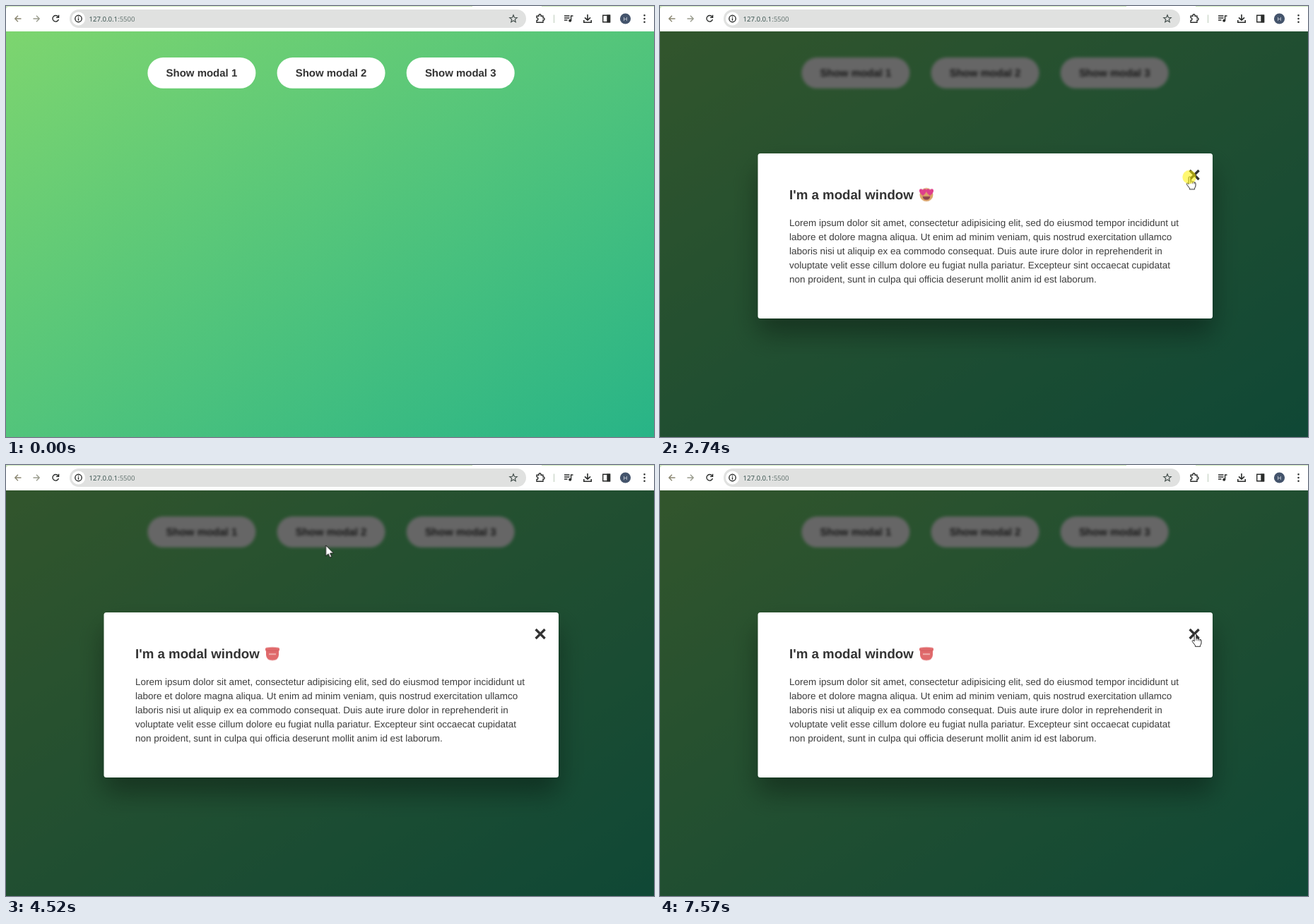
Recreate the animation shown at these times as an HTML page. Size 917 by 611 pixels, loop 8000 ms.

```html
<!DOCTYPE html>
<html lang="en">
<head>
<meta charset="utf-8">
<title>Modal windows</title>
<style>
  html, body { margin: 0; width: 100%; height: 100%; overflow: hidden; background: #fff; }
  .page { position: absolute; left: 0; top: 36px; width: 917px; height: 575px;
    background: linear-gradient(to top left, #28b487, #7dd56f); }
  svg { position: absolute; left: 0; top: 0; width: 917px; height: 611px; }
  text { font-family: "Liberation Sans", Arial, sans-serif; fill: #333; text-rendering: geometricPrecision; white-space: pre; }
  .btn text { font-size: 14.97px; font-weight: 700; }
  .title { font-size: 18.7px; font-weight: 700; }
  .copy text { font-size: 13.47px; fill: #3c3c3c; }
  .url { font: 9.6px "Open Sans", "Noto Sans", sans-serif; fill: #2f4a46; }
  .ico { fill: none; stroke: #2b2d2c; stroke-width: 1.4; }

  .btns, .overlay, .love, .hand, .arrow, .press, .cursor { animation: 8s step-end infinite; }
  .btns { animation-name: blur; }
  .overlay { animation-name: open; }
  .love { animation-name: love; }
  .angry { animation: love 8s step-end infinite reverse; }
  .hand { animation-name: hand; }
  .arrow { animation-name: arrow; }
  .press { animation-name: press; }
  .cursor { animation-name: move; animation-timing-function: linear; }

  @keyframes open {
    0%, 35.875%, 75.25% { opacity: 0; }
    17.875%, 53%, 86%, 100% { opacity: 1; }
  }
  @keyframes blur {
    0%, 35.875%, 75.25% { filter: none; }
    17.875%, 53%, 86%, 100% { filter: blur(2px); }
  }
  @keyframes love { 0% { opacity: 1; } 45%, 100% { opacity: 0; } }
  @keyframes hand {
    0%, 17.875%, 35.875%, 53%, 75.25%, 86% { opacity: 0; }
    12.625%, 30.875%, 46.5%, 63.625%, 80.625%, 93.125%, 100% { opacity: 1; }
  }
  @keyframes arrow {
    0%, 12.625%, 30.875%, 46.5%, 63.625%, 80.625%, 93.125%, 100% { opacity: 0; }
    3%, 17.875%, 35.875%, 53%, 75.25%, 86% { opacity: 1; }
  }
  @keyframes press {
    0%, 17.875%, 35.875%, 53%, 75.25%, 86%, 100% { opacity: 0; }
    17%, 34.25%, 51.375%, 74.375%, 84.375% { opacity: .56; }
  }
  @keyframes move {
    0%, 3% { transform: translate(880px, 600px); }
    6.5% { transform: translate(560px, 340px); }
    8.25% { transform: translate(287px, 116px); }
    9% { transform: translate(232px, 62px); }
    9.875% { transform: translate(210px, 35px); }
    10.875% { transform: translate(217px, 42px); }
    11.875% { transform: translate(239px, 73px); }
    12.625% { transform: translate(246px, 84px); }
    13.5%, 20.375% { transform: translate(247px, 82px); }
    22.125% { transform: translate(300px, 108px); }
    25% { transform: translate(540px, 215px); }
    27.5% { transform: translate(700px, 252px); }
    30% { transform: translate(743px, 250px); }
    30.875%, 35.875% { transform: translate(749px, 242.5px); }
    38.5% { transform: translate(728px, 240px); }
    40.25% { transform: translate(500px, 173px); }
    41.125% { transform: translate(478px, 169px); }
    42% { transform: translate(446px, 164px); }
    43.75%, 45% { transform: translate(405px, 132px); }
    48.125%, 55.625% { transform: translate(428px, 95px); }
    57.5% { transform: translate(480px, 135px); }
    60% { transform: translate(660px, 225px); }
    61.875% { transform: translate(735px, 255px); }
    64.375%, 75.25% { transform: translate(757px, 245px); }
    77.5% { transform: translate(700px, 190px); }
    79.375% { transform: translate(615px, 120px); }
    81.125%, 86.875% { transform: translate(597px, 106px); }
    89.375% { transform: translate(660px, 162px); }
    91.875% { transform: translate(740px, 232px); }
    93.75% { transform: translate(758px, 243px); }
    94.625%, 100% { transform: translate(757px, 240px); }
  }
</style>
</head>
<body>
<div class="page"></div>
<svg viewBox="0 0 917 611">
  <defs>
    <filter id="soft" x="-20%" y="-50%" width="140%" height="200%"><feGaussianBlur stdDeviation="18.5"/></filter>
    <clipPath id="view"><path d="M0 36H917V611H0Z"/></clipPath>
    <path id="heart" d="M0 4.6C-5.4 .8-5-3.4-2.4-3.6-1-3.6 0-2.4 0-1.6 0-2.4 1-3.6 2.4-3.6 5-3.4 5.4 .8 0 4.6Z"/>
  </defs>

  <!-- Browser bar -->
  <path d="M0 0H917V36H0Z" fill="#fff"/>
  <path d="M0 0H660V1H4Q1 1 0 4ZM758 0H917V1H758Z" fill="#cfe8bd"/>
  <rect x="90" y="5" width="646" height="26" rx="13" fill="#e0e1e0"/>
  <circle cx="102.5" cy="18" r="9.5" fill="#fff"/>
  <text class="url" x="117.5" y="21.6">127.0.0.1<tspan fill="#5f706c">:5500</tspan></text>
  <g class="ico">
    <path d="M21.5 18H13M17 13.8 12.8 18 17 22.2" stroke="#8b8772"/>
    <path d="M38.5 18H47M43 13.8 47.2 18 43 22.2" stroke="#9a9c8e"/>
    <path d="M74 15.6A4.3 4.3 0 1 0 74.4 19M74.6 12.8V16.4H71"/>
    <circle cx="102.5" cy="18" r="4.7"/>
    <path d="M102.5 17.2V20.8M102.5 15V16.3"/>
    <path d="M718 12.8 719.4 16.3 723.2 16.6 720.3 19 721.2 22.7 718 20.7 714.8 22.7 715.7 19 712.8 16.6 716.6 16.3Z" stroke="#47524f" stroke-width="1.2"/>
    <path d="M751 14.2H754V13.3A1.4 1.4 0 0 1 757 13.3V14.2H760V17H760.6A1.4 1.4 0 0 1 760.6 20H760V23.2H751V20.4A1.9 1.9 0 0 0 751 16.6Z"/>
    <path d="M775.5 12.5V24" stroke="#c9d5c8" stroke-width="1.3"/>
    <path d="M790 14H797.5M790 17H797.5M790 20H794.5M799.6 21V14H802.5"/>
    <circle cx="798.2" cy="20.8" r="1.3" fill="#2b2d2c"/>
    <path d="M823 12V20M819 16.4 823 20.2 827 16.4M817.8 20V23.3H828.2V20" stroke-width="1.6"/>
    <path d="M844.7 13.3H854.5V22.7H844.7Z"/>
    <path d="M851 13.3H854.5V22.7H851Z" fill="#2b2d2c"/>
  </g>
  <circle cx="876.5" cy="18" r="7.6" fill="#44546c"/>
  <text x="876.5" y="20.8" font-size="7.5" text-anchor="middle" style="fill:#e8ecf2">H</text>
  <path d="M903.5 13.2v.01M903.5 18v.01M903.5 22.8v.01" stroke="#2b2d2c" stroke-width="2.5" stroke-linecap="round"/>

  <g clip-path="url(#view)">
    <g class="btns" id="btns"></g>
    <g class="overlay">
      <path d="M0 36H917V611H0Z" opacity=".6"/>
      <rect x="138.5" y="231" width="643.5" height="234" rx="4" opacity=".34" filter="url(#soft)"/>
      <rect x="138.5" y="209" width="643.5" height="234" rx="3.5" fill="#fff"/>
      <path d="M749.6 233 762.6 246M762.6 233 749.6 246" stroke="#333" stroke-width="3.3"/>
      <text class="title" x="183" y="274">I'm a modal window</text>
      <g class="love" transform="translate(377 267.5)">
        <circle r="9.5" fill="#dca468"/>
        <path d="M-5.5 2.5H5.5Q4.6 7.3 0 7.3T-5.5 2.5Z" fill="#8c3f4e"/>
        <g fill="#df3f8c">
          <use href="#heart" transform="translate(-5 -4) scale(1.2)"/>
          <use href="#heart" transform="translate(5 -4) scale(1.2)"/>
        </g>
      </g>
      <g class="angry-face" id="angry" transform="translate(377 267.5)">
        <path d="M-8.5-8.5Q0-10 8.5-8.5L10-7.5V-5L9-3.5V2Q8.4 9.4 0 9.4T-9 2V-3.5L-10-5V-7.5Z" fill="#e06a6c"/>
        <path d="M-5 .6H5" stroke="#f6d2d0" stroke-width="1.3"/>
        <path d="M-8-4.5Q0-3.4 8-4.5" fill="none" stroke="#cf585c" stroke-width=".8"/>
      </g>
      <g class="copy" id="copy"></g>
    </g>
  </g>

  <g class="cursor">
    <path class="arrow" d="M0 0V15.2L3.5 12 5.8 17.3 8.2 16.2 6 11.1H10.8Z" fill="#fff" stroke="#111" stroke-width=".9"/>
    <g class="hand" stroke="#1a1a1a" stroke-width=".95" stroke-linejoin="round">
      <path fill="#fff" d="M-.9 10V1.2Q-.9-.5 .5-.5T1.9 1.2V6Q4.2 5 4.5 6.8 6.6 6 6.9 7.6 9 7.1 9 9V12Q9 14.2 7.6 15.6V17.3H.4V15.8L-3.5 10.6Q-4.3 9 -3.1 8.5 -2 8.2 -.9 10Z"/>
      <path fill="none" d="M1.9 6V9M4.5 6.8V9.4M6.9 7.6V9.8" stroke-width=".7"/>
    </g>
    <circle class="press" r="9.7" fill="#fff200"/>
  </g>
</svg>
<script>
  const svg = (parent, tag, attrs, text = '') => {
    const el = document.createElementNS('http://www.w3.org/2000/svg', tag);
    for (const key in attrs) el.setAttribute(key, attrs[key]);
    el.textContent = text;
    return parent.appendChild(el);
  };
  const byId = id => document.getElementById(id);

  for (let i = 0; i < 3; i++) {
    const x = 200.4 + 183.15 * i;
    const btn = svg(byId('btns'), 'g', { class: 'btn' });
    svg(btn, 'rect', { x, y: 73, width: 153, height: 43.8, rx: 21.9, fill: '#fff' });
    svg(btn, 'text', { x: x + 76.5, y: 100.3, 'text-anchor': 'middle' }, `Show modal ${i + 1}`);
  }

  [
    'Lorem ipsum dolor sit amet, consectetur adipisicing elit, sed do eiusmod tempor incididunt ut',
    'labore et dolore magna aliqua. Ut enim ad minim veniam, quis nostrud exercitation ullamco',
    'laboris nisi ut aliquip ex ea commodo consequat. Duis aute irure dolor in reprehenderit in',
    'voluptate velit esse cillum dolore eu fugiat nulla pariatur. Excepteur sint occaecat cupidatat',
    'non proident, sunt in culpa qui officia deserunt mollit anim id est laborum.'
  ].forEach((line, i) => svg(byId('copy'), 'text', { x: 183, y: 311.6 + 20.15 * i }, line));

  // The second face takes over where the first one hides.
  byId('angry').animate(
    [{ opacity: 0, offset: 0 }, { opacity: 0, offset: .45 }, { opacity: 1, offset: .45 }, { opacity: 1, offset: 1 }],
    { duration: 8000, iterations: Infinity }
  );
</script>
</body>
</html>
```
